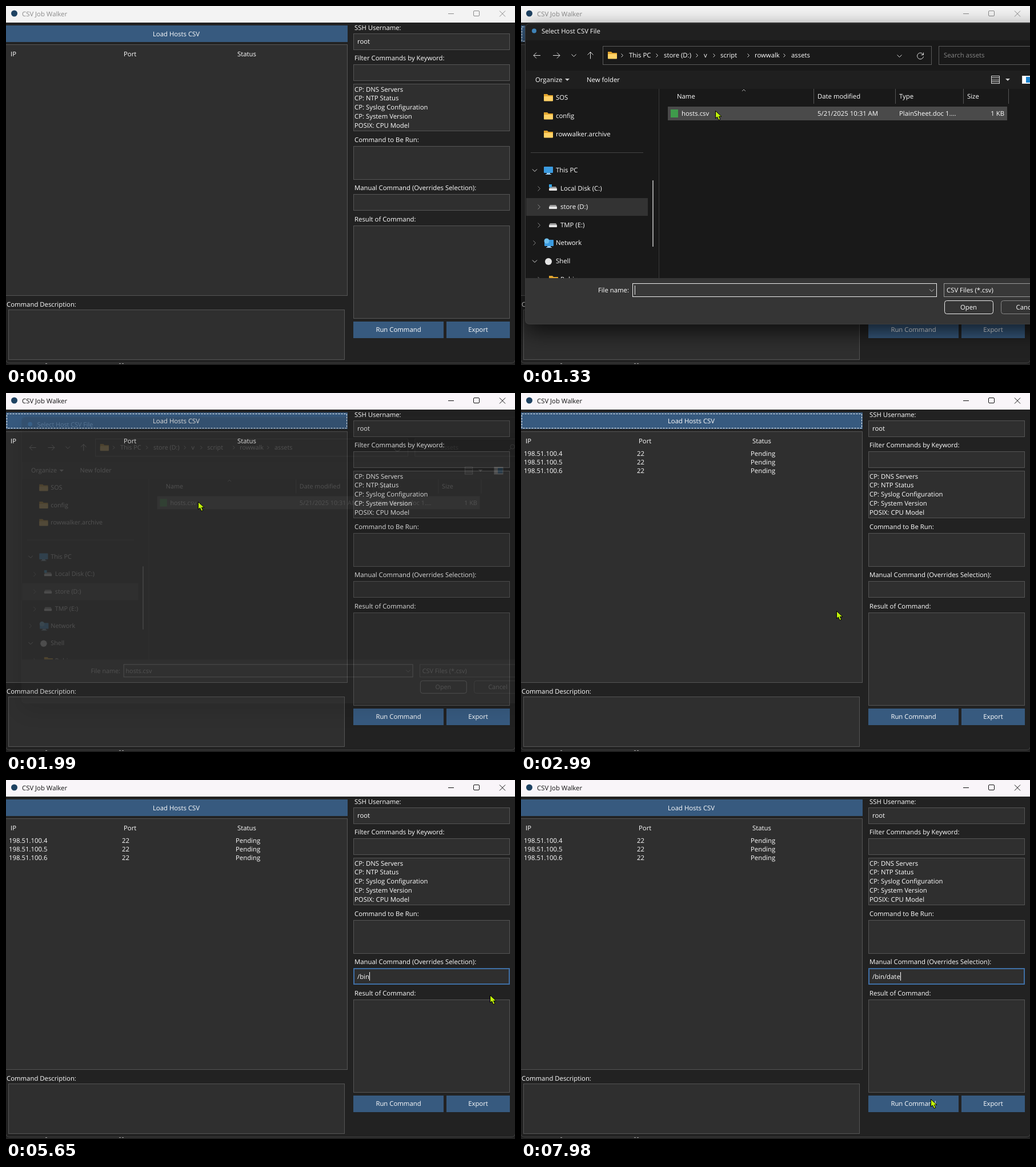
An HTML page for the animation above (8 s loop, 891x628 px).

```html
<!DOCTYPE html>
<html lang="en">
<head>
<meta charset="utf-8">
<title>CSV Job Walker</title>
<style>
html, body { margin: 0; width: 100%; height: 100%; overflow: hidden; background: #222; }
svg { display: block; width: 891px; height: 628px; overflow: hidden; }
text { font: 11.35px "Open Sans", "Noto Sans", sans-serif; fill: #fff; white-space: pre; text-rendering: geometricPrecision; }
.line { fill: none; stroke-width: 1; }
#sheet { filter: drop-shadow(0 13px 19px rgba(0, 0, 0, .7)); }
</style>
</head>
<body>
<svg id="stage" viewBox="0 0 891 628" xmlns="http://www.w3.org/2000/svg"></svg>
<script>
const LOOP = 8000;
const BLUE = '#375a7f', FIELD = '#2f2f2f', EDGE = '#555';

// Text is placed by the vertical middle of its capitals.
const text = (x, y, s, extra = '') => `<text x="${x}" y="${y + 4}" ${extra}>${s}</text>`;
const mid = (x, y, s) => text(x, y, s, 'text-anchor="middle"');
const end = (x, y, s) => text(x, y, s, 'text-anchor="end"');
const rect = (x, y, w, h, fill, extra = '') =>
  `<rect x="${x}" y="${y}" width="${w}" height="${h}" fill="${fill}" ${extra}/>`;
const box = (x, y, r, b, fill = FIELD, stroke = EDGE, extra = '') =>
  rect(x + .5, y + .5, r - x - 1, b - y - 1, fill, `stroke="${stroke}" ${extra}`);
const line = (d, stroke = '#ddd', extra = '') => `<path class="line" d="${d}" stroke="${stroke}" ${extra}/>`;
const dot = (x, y, r, fill) => `<circle cx="${x}" cy="${y}" r="${r}" fill="${fill}"/>`;
const group = (id, body, extra = '') => `<g id="${id}" ${extra}>${body}</g>`;

const chevron = (x, y, dir, size = 3, stroke = '#ddd') => {
  const turn = { right: 0, down: 90, left: 180, up: 270 }[dir];
  return line(`M${-size / 2} ${-size}L${size / 2} 0L${-size / 2} ${size}`, stroke,
    `transform="translate(${x} ${y}) rotate(${turn})"`);
};
const arrow = (x, y, turn, stroke = '#ddd') =>
  line('M-6 0H6M-1 -5L-6 0L-1 5', stroke, `transform="translate(${x} ${y}) rotate(${turn})"`);
const triangle = (x, y) => `<path d="M${x - 4} ${y - 2}h8l-4 4z" fill="#ccc"/>`;
const folder = (x, y) =>
  `<path d="M${x} ${y - 6}h6l2 2h8v10h-16z" fill="#e2a52e"/>` + rect(x, y - 2, 16, 8.5, '#ffd267', 'rx="1"');
const drive = (x, y) =>
  `<path d="M${x + 2} ${y - 3}h10l2 3h-14z" fill="#999"/>` + rect(x, y, 14, 4, '#e4e4e4', 'rx="1"');
const monitor = (x, y) =>
  rect(x, y - 6, 16, 11, '#3b9be0', 'rx="1"') + rect(x + 5, y + 5, 6, 2, '#9cc8e8') + rect(x + 3, y + 7, 10, 1, '#9cc8e8');

function titleBar(id, fill, ink) {
  return group(id,
    rect(0, 0, 891, 29, fill) + dot(14.5, 13, 5.5, '#1e4262') +
    text(28, 13.5, 'CSV Job Walker', `style="fill:${ink}"`) +
    line('M774 13.5H784M864 8.5L874 18.5M874 8.5L864 18.5', ink) +
    box(818, 8, 829, 18, 'none', ink, 'rx="1.5"'));
}

function mainWindow() {
  const labels = [[38, 'SSH Username:'], [91, 'Filter Commands by Keyword:'], [234, 'Command to Be Run:'],
    [318, 'Manual Command (Overrides Selection):'], [373, 'Result of Command:']];
  const fields = [[48, 77], [102, 131], [136, 219], [245, 304], [329, 358], [384, 547]];
  const list = ['CP: DNS Servers', 'CP: NTP Status', 'CP: Syslog Configuration', 'CP: System Version', 'POSIX: CPU Model'];
  const hosts = [4, 5, 6].map((n, i) => {
    const y = 106 + 15 * i;
    return text(5, y, '198.51.100.' + n) + text(203, y, '22') + text(402, y, 'Pending');
  }).join('');
  return rect(0, 0, 891, 628, '#222') +
    titleBar('idle', '#f3f3f3', '#8a8a8a') + titleBar('active', '#f9f5f9', '#111') +
    rect(0, 34, 598, 29, BLUE) + mid(298, 48.5, 'Load Hosts CSV') +
    box(-2, 67, 598, 507) + text(8, 84, 'IP') + text(206, 84, 'Port') + text(405, 84, 'Status') +
    group('hosts', hosts) +
    text(1, 521.5, 'Command Description:') + box(4, 531, 593, 619) +
    labels.map(([y, s]) => text(610, y, s)).join('') +
    fields.map(([y, b]) => box(608, y, 882, b)).join('') +
    text(615, 62, 'root') + list.map((s, i) => text(610, 145.5 + 15.9 * i, s)).join('') +
    rect(608, 552, 158, 29, BLUE) + mid(687, 566, 'Run Command') +
    rect(771, 552, 111, 29, BLUE) + mid(826.5, 566, 'Export') +
    line('M0 620Q1 624.5 7 624.5H884Q890 624.5 891 620', '#444') +
    line('M69 625.5h3M198 625.5h3M203 625.5h3', '#999') +
    group('dashes', line('M1.5 36.5H596.5V61.5H1.5Z', '#fff', 'stroke-dasharray="3 2"')) +
    group('hover', box(608, 329, 882, 358, 'none', '#3f6fa5')) +
    group('focus', box(609, 330, 881, 357, 'none', '#3f6fa5')) +
    text(615, 344, '', 'id="typed"') + rect(615, 336, 1, 15, '#fff', 'id="caret"');
}

function addressBar() {
  const crumbs = [[189, 'This PC'], [250, 'store (D:)'], [320, 'v'], [349, 'script'], [409, 'rowwalk'], [473, 'assets']];
  return arrow(28, 86.5, 0) + arrow(62, 86.5, 180) + chevron(92.5, 86.5, 'down', 4) + arrow(121.5, 86.5, 90) +
    box(143, 70, 719, 103, '#191919', '#5a5a5a') + folder(152, 86) +
    [177, 238, 308, 338, 398, 461].map(x => chevron(x, 86.5, 'right')).join('') +
    crumbs.map(([x, s]) => text(x, 86, s)).join('') +
    chevron(662.5, 87.5, 'down', 4) + line('M704 85A5.5 5.5 0 1 0 704.5 88.5M704.5 81.5V85.5H700.5') +
    box(731, 70, 920, 103, '#191919', '#5a5a5a') + text(740, 86, 'Search assets', 'style="fill:#858585"') +
    `<circle class="line" cx="911" cy="85" r="4" stroke="#aaa"/>` + line('M908 88L904 92', '#aaa');
}

function sidebar() {
  return folder(40, 160) + text(61, 160, 'SOS') + folder(40, 192) + text(61, 192, 'config') +
    folder(40, 224) + text(61, 224, 'rowwalker.archive') + line('M17 256.5H214', '#444') +
    rect(9, 336, 213, 31, '#333') +
    chevron(24, 287.5, 'down', 4) + monitor(40, 287) + text(61, 287, 'This PC') +
    [[319, 'Local Disk (C:)'], [351, 'store (D:)'], [383, 'TMP (E:)']].map(([y, s]) =>
      chevron(31.5, y + .5, 'right', 4, '#888') + drive(49, y) + text(69, y, s)).join('') +
    rect(49, 312, 5, 5, '#35a7ea') +
    chevron(23.5, 414.5, 'right', 4, '#888') + monitor(41, 415) + dot(45, 411, 4.5, '#6fc0ee') + text(61, 414, 'Network') +
    chevron(24, 446.5, 'down', 4) + dot(48, 447, 6, '#e4e4e4') + text(61, 446, 'Shell') +
    group('cut', chevron(31.5, 478, 'right', 4, '#888') + folder(49, 478) + text(69, 478, 'Rubix'), 'clip-path="url(#body)"') +
    rect(230, 305, 2, 116, '#9b9b9b') + line('M241.5 145V476', '#3a3a3a');
}

function fileList() {
  return chevron(390, 147.5, 'up', 3, '#aaa') +
    [[273, 'Name'], [519, 'Date modified'], [662, 'Type'], [781, 'Size']].map(([x, s]) => text(x, 157.5, s)).join('') +
    line('M512.5 145V171M655.5 145V171M774.5 145V171M853.5 145V171', '#555') +
    rect(257, 176, 594, 24, '#4a4a4a') + rect(262, 181, 13, 14, '#3f9b4b') +
    text(281, 188, 'hosts.csv') + text(519, 188, '5/21/2025 10:31 AM') +
    text(662, 188, 'PlainSheet.doc 1....') + end(846, 188, '1 KB');
}

function dialog() {
  return `<clipPath id="body"><rect x="7" y="113" width="235" height="363"/></clipPath>` +
    rect(7, 30, 925, 527, '#191919', 'id="sheet" rx="8"') +
    `<path d="M7 60V38Q7 30 15 30H932V60Z" fill="#202020"/>` + rect(7, 113, 925, 32, '#1f1f1f') +
    `<path d="M7 476H932V557H15Q7 557 7 549Z" fill="#353535"/>` +
    box(7, 30, 932, 557, 'none', '#3c3c3c', 'rx="8"') +
    dot(23, 43.5, 4, '#3f83b8') + text(36, 44, 'Select Host CSV File') + addressBar() +
    text(25, 128.5, 'Organize') + triangle(81, 129) + text(115, 128.5, 'New folder') +
    box(823, 122, 838, 136, 'none', '#ddd') + line('M824 125.5H837M824 129.5H837M824 132.5H837') + triangle(852, 129) +
    box(877, 122, 894, 136, '#fff', '#ddd') + rect(884, 124, 9, 10, '#1b84d0') +
    sidebar() + fileList() +
    end(189, 497, 'File name:') + box(195, 485, 728, 509, '#383838', '#eee') + chevron(719, 497.5, 'down', 4, '#bbb') +
    group('picked', text(199, 497, 'hosts.csv')) + group('blank', rect(199, 489, 1, 16, '#eee')) +
    box(740, 485, 926, 509, '#383838', '#999') + text(745, 497, 'CSV Files (*.csv)') +
    box(741, 515, 827, 539, '#353535', '#eee', 'rx="4"') + mid(783.5, 527, 'Open') +
    box(840, 515, 926, 539, '#353535', '#888', 'rx="4"') + mid(884, 527, 'Cancel');
}

const pointers =
  group('arrow', '<path d="M.5 .5V13.5L3.5 11L6 16.5L8.8 15.3L6.5 10.3H11Z" fill="#c0f20c" stroke="#000"/>') +
  group('beam', line('M2 1.5H9M5.5 1.5V16.5M2 16.5H9', '#000', 'style="stroke-width:3"') +
    line('M2 1.5H9M5.5 1.5V16.5M2 16.5H9', '#c8d010'));

const stage = document.getElementById('stage');
stage.innerHTML = mainWindow() + group('dialog', dialog()) + pointers;
const el = id => document.getElementById(id);

// time, x, y, shape; no place means the pointer is out of view
const moves = [
  [0], [330, 147, 65], [660, 326, 43], [1000, 288, 145], [1330, 340, 183], [1660, 336, 190],
  [2330], [2650, 386, 240], [2990, 552, 381], [3320, 600, 377],
  [3650, 657, 333, 'beam'], [3990, 713, 329, 'beam'], [4320, 847, 376], [6980, 722, 380],
  [7310], [7980, 717, 558]
];
const typing = [[0, 0], [5320, 1], [5650, 4], [5980, 7], [6310, 9]];
const blinks = [[0, 4320], [4650, 4990], [6650, 6980], [7310, 7640]];

const at = (steps, t) => steps.filter(s => s[0] <= t).pop();
const show = (id, on) => { el(id).style.display = on ? '' : 'none'; };

function draw(t) {
  const closing = t >= 1990;
  show('idle', !closing);
  show('active', closing);
  show('dashes', t >= 1330 && t < 4320);
  show('hosts', t >= 2330);
  show('hover', t >= 3650);
  show('focus', t >= 4320);

  show('dialog', t >= 1330 && t < 2330);
  show('picked', closing);
  show('blank', !closing);
  el('dialog').setAttribute('opacity', closing ? .16 : 1);
  el('dialog').setAttribute('transform', closing ? 'translate(20.25 13.2) scale(.951)' : '');

  const typed = el('typed');
  typed.textContent = '/bin/date'.slice(0, at(typing, t)[1]);
  const width = typed.textContent ? typed.getComputedTextLength() : 0;
  el('caret').setAttribute('x', 615 + Math.round(width));
  show('caret', !blinks.some(([a, b]) => t >= a && t < b));

  const [, x, y, shape = 'arrow'] = at(moves, t);
  for (const id of ['arrow', 'beam']) {
    show(id, x !== undefined && id === shape);
    if (x !== undefined) el(id).setAttribute('transform', `translate(${x} ${y})`);
  }
}

const start = performance.now();
function tick() {
  draw((performance.now() - start) % LOOP);
  requestAnimationFrame(tick);
}
tick();
</script>
</body>
</html>
```
